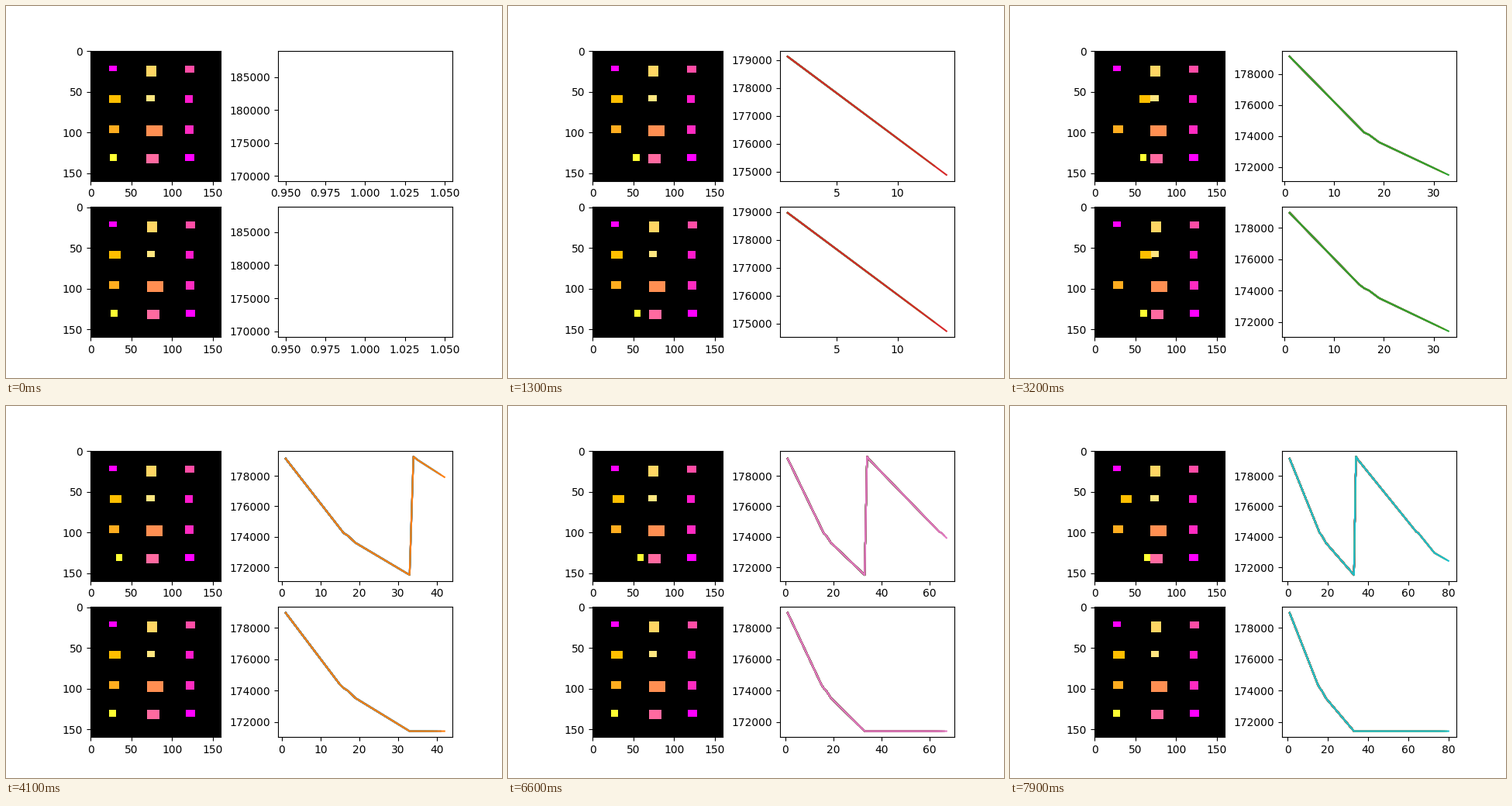
Recreate the animation shown at these times as a matplotlib script. Size 640 by 480 pixels, loop 8000 ms.

```python
import numpy as np
import matplotlib.pyplot as plt
from matplotlib.animation import FuncAnimation
from matplotlib.colors import to_rgb

SIZE = 160
STEPS = 80
RESTART = 34                      # step at which the search starts over
START, PEAK = 179293.0, 179265.0  # energy before any move, and at the restart
GAIN_Y, GAIN_G = 163.15, 75.5     # energy drop per unit moved

# width, height and colour of the blocks, row by row
GRID = [
    [(9, 7, "#ff00ff"), (12, 13, "#ffd664"), (12, 9, "#ff4da6")],
    [(14, 10, "#ffbf00"), (10, 8, "#ffe680"), (10, 10, "#ff1acc")],
    [(12, 10, "#ffad1f"), (20, 14, "#ff8f52"), (11, 11, "#ff2bc0")],
    [(8, 8, "#ffff33"), (15, 11, "#ff6aa0"), (12, 8, "#ff00ff")],
]
GOLD, YELLOW = (1, 0), (3, 0)     # the two cells that move

# "y" shifts the yellow block by one unit, "g" the gold one
FIRST = "y" * 31 + "gggygy" + "g" * 29
SECOND = "gy" + "y" * 29 + "g" + "y" * 8 + "g" * 7


def state(moves):
    y, g = moves.count("y"), moves.count("g")
    return y, g, START - y * GAIN_Y - g * GAIN_G


def current(n):
    if n < RESTART:
        return state(FIRST[:2 * n - 1])
    if n == RESTART:
        return 0, 0, PEAK
    return state(SECOND[:n - RESTART + 1])


def proposal(n):
    if n < RESTART:
        return state(FIRST[:2 * n])
    return 0, 0, state(FIRST)[2]


def board(dy, dg):
    img = np.zeros((SIZE, SIZE, 3))
    shift = {YELLOW: dy, GOLD: dg}
    for r, row in enumerate(GRID):
        for c, (w, h, color) in enumerate(row):
            x = int(23 + 46.5 * c) + shift.get((r, c), 0)
            y = round(18 + 36.4 * r)
            img[y:y + h, x:x + w] = to_rgb(color)
    return img


fig, axes = plt.subplots(2, 2, figsize=(6.4, 4.8), dpi=100)
steps = np.arange(1, STEPS + 1)
rows = []
for (left, right), rule in zip(axes, (current, proposal)):
    states = [rule(n) for n in steps]
    energy = [s[2] for s in states]
    image = left.imshow(board(*states[0][:2]), interpolation="nearest")
    lines = [right.plot(steps[:n], energy[:n], color=f"C{(n - 1) % 10}")[0]
             for n in steps]
    rows.append((states, image, right, lines))


def update(k):
    for states, image, ax, lines in rows:
        image.set_data(board(*states[k][:2]))
        for i, line in enumerate(lines):
            line.set_visible(i <= k)
        ax.relim(visible_only=True)
        ax.autoscale_view()
    return []


anim = FuncAnimation(fig, update, frames=STEPS, interval=100,
                     init_func=lambda: [], repeat=True, repeat_delay=0)
plt.show()
```
